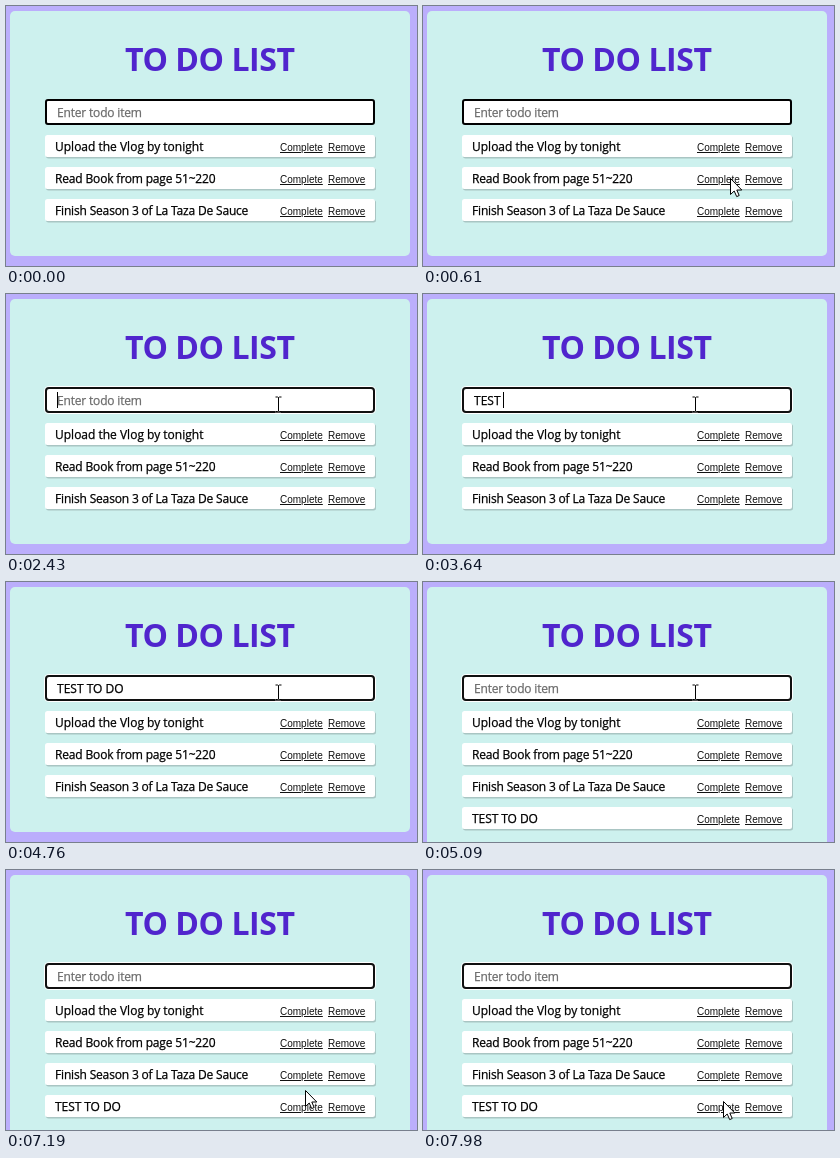
An HTML page that plays this animation: 411 px wide and 260 px high, repeating every 8000 ms.

```html
<!DOCTYPE html>
<html lang="en">
<head>
<meta charset="utf-8">
<title>To do list</title>
<style>
  html, body { margin: 0; width: 100%; height: 100%; overflow: hidden; background: #bbaefc; }
  svg { display: block; width: 100vw; height: 100vh; }
  text { white-space: pre; }
  .title { font: 700 32px "Open Sans", "Noto Sans", sans-serif; letter-spacing: -.45px; fill: #5025cd; }
  .label { font: 400 12px "Open Sans", "Noto Sans", sans-serif; fill: #000; stroke: #000; stroke-width: .25px; }
  .hint { fill: #6c6c6c; stroke: #6c6c6c; letter-spacing: -.17px; }
  .link { font: 10px "Liberation Sans", Arial, sans-serif; fill: #111; text-decoration: underline; }
</style>
</head>
<body>
<svg viewBox="0 0 411 260">
  <rect width="411" height="260" fill="#bbaefc"/>
  <rect id="panel" x="4" y="5" width="400" height="245" rx="5" fill="#cdf1ee"/>
  <text class="title" x="119" y="65">TO DO LIST</text>

  <rect id="ring" x="38.5" y="92.5" width="331" height="27" rx="4" fill="none" stroke="#fff"/>
  <rect id="field" x="40" y="94" width="328" height="24" rx="2" fill="#fff" stroke="#000" stroke-width="2"/>
  <text id="hint" class="label hint" x="51" y="111">Enter todo item</text>
  <text id="typed" class="label" x="51" y="111"></text>
  <rect id="caret" y="98" width="1" height="16"/>

  <g id="items"></g>

  <circle id="press" cx="270" cy="110" r="15" fill="#fbe800" opacity=".75"/>
  <g id="beam" fill="none">
    <path d="M-3 -7.5H3M0 -7V7M-3 7.5H3" stroke="#fff" stroke-width="2" opacity=".5"/>
    <path d="M-2.5 -7H-.5L.5 -6.5L1.5 -7H3.5M.5 -6.5V7M-2.5 7.5H-.5L.5 7L1.5 7.5H3.5" stroke="#000"/>
  </g>
  <path id="arrow" d="M.5 .5V16.5L4.2 13L6.7 18.6L9.2 17.5L6.8 12H11.8Z" fill="#fff" stroke="#000" stroke-linejoin="round"/>
</svg>
<script>
const LOOP = 8000, BLINK = 530, STEP = 70;
const CLICK = 1360, RELEASE = 1500, SUBMIT = 5090;
const WORDS = "TEST TO DO";
const KEYS = [2760, 3180, 3310, 3440, 3640, 3760, 3880, 4000, 4110, 4230];

// label, letter spacing
const ITEMS = [
  ["Upload the Vlog by tonight", 0],
  ["Read Book from page 51~220", -.17],
  ["Finish Season 3 of La Taza De Sauce", -.17],
  [WORDS, -.08],
];

// time, x, y of the pointer
const ROUTE = [
  [260, 354, 256], [470, 332, 215], [680, 295, 150], [820, 277, 118], [960, 272, 110],
  [5870, 272, 110], [6290, 260, 191], [6570, 274, 242],
  [6700, 274, 242], [7190, 299, 220], [7320, 299, 220], [7450, 292, 210], [7720, 300, 231],
];
const MOVES = [260, 960, 5870, 6570, 6700, 7720];

const $ = id => document.getElementById(id);
const show = (id, on) => $(id).setAttribute("visibility", on ? "visible" : "hidden");

$("items").innerHTML = ITEMS.map(([label, spacing], i) => `
  <g transform="translate(0 ${129 + 32 * i})">
    <rect x="40" y="1" width="330" height="22.5" rx="2.5" fill="#a9c5c3"/>
    <rect x="39" y="0" width="330" height="22" rx="2.5" fill="#fff"/>
    <text class="label" x="49" y="16" style="letter-spacing:${spacing}px">${label}</text>
    <text class="link" x="274" y="16">Complete</text>
    <text class="link" x="322" y="16">Remove</text>
  </g>`).join("");
const added = $("items").lastElementChild;

function pointerAt(t) {
  const start = MOVES.filter(m => m <= t).pop();
  const s = start + Math.floor((t - start) / STEP) * STEP;
  const i = ROUTE.findIndex(p => p[0] > s);
  if (i < 0) return ROUTE[ROUTE.length - 1].slice(1);
  const [t0, x0, y0] = ROUTE[i - 1], [t1, x1, y1] = ROUTE[i];
  const k = (s - t0) / (t1 - t0);
  return [x0 + (x1 - x0) * k, y0 + (y1 - y0) * k].map(Math.round);
}

function caretOn(t) {
  if (t < CLICK) return false;
  const reset = [CLICK, ...KEYS].filter(k => k <= t).pop();
  return Math.floor((t - reset) / BLINK) % 2 === 0;
}

function draw(t) {
  const focused = t >= CLICK, sent = t >= SUBMIT;
  const count = sent ? 0 : KEYS.filter(k => k <= t).length;

  $("panel").setAttribute("height", sent ? 277 : 245);
  added.setAttribute("visibility", sent ? "visible" : "hidden");
  show("ring", focused);
  $("field").setAttribute("rx", focused ? 3 : 2);
  $("field").setAttribute("stroke", focused ? "#101010" : "#000");

  show("hint", count === 0);
  $("typed").textContent = WORDS.slice(0, count);
  const width = count ? $("typed").getComputedTextLength() : 0;
  $("caret").setAttribute("x", 51 + Math.floor(width));
  show("caret", caretOn(t));
  show("press", t >= CLICK && t < RELEASE);

  const visible = t >= MOVES[0];
  const [x, y] = visible ? pointerAt(t) : [0, 0];
  const inField = x >= 39 && x < 369 && y >= 93 && y < 119;
  show("beam", visible && inField);
  show("arrow", visible && !inField);
  for (const id of ["beam", "arrow"]) $(id).setAttribute("transform", `translate(${x} ${y})`);
}

const begin = performance.now();
function tick() {
  draw((performance.now() - begin) % LOOP);
  requestAnimationFrame(tick);
}
tick();
</script>
</body>
</html>
```
